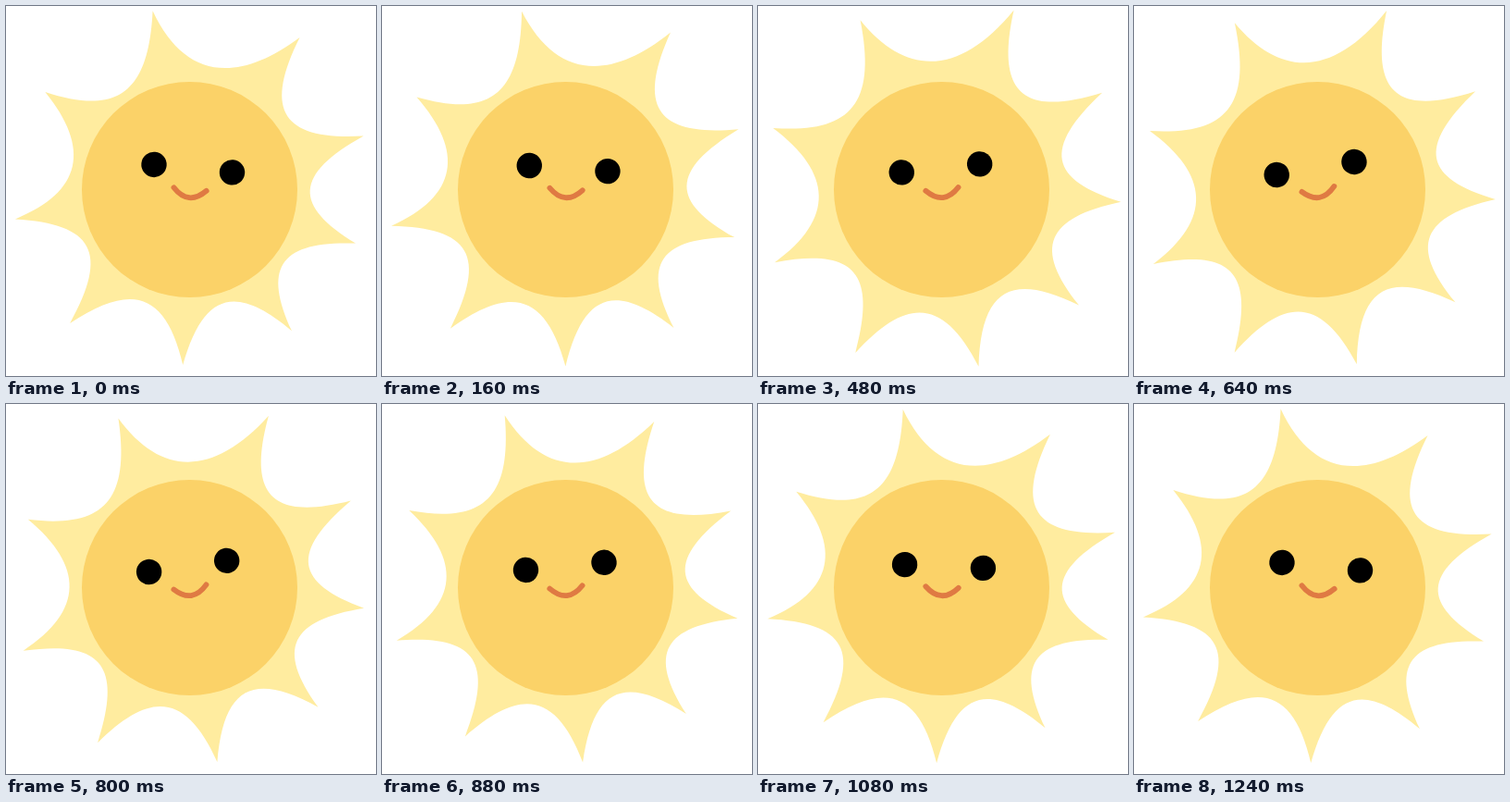
These frames come from a looping animation (400 by 400 pixels, 1.28 s). An HTML page:

```html
<!DOCTYPE html>
<html lang="en">
<head>
<meta charset="utf-8">
<title>Smiling sun</title>
<style>
  html, body { margin: 0; width: 100%; height: 100%; overflow: hidden; background: #fff; }
  svg { display: block; width: 100%; height: 100%; }
</style>
</head>
<body>
<svg viewBox="0 0 400 400">
  <path id="rays" fill="#ffec9f"/>
  <circle cx="198.5" cy="198.5" r="116.5" fill="#fbd268"/>
  <g id="face">
    <circle cx="157.5" cy="175.4" r="13.7"/>
    <circle cx="242.4" cy="175.4" r="13.7"/>
    <path d="M181.3 198Q199 216.4 216.7 198" fill="none" stroke="#df7a43" stroke-width="5.8" stroke-linecap="round"/>
  </g>
</svg>
<script>
const LOOP = 1280;
const rays = document.getElementById('rays');
const face = document.getElementById('face');

// Each ray: tip angle (clockwise from up), tip radius, then the hollow after it:
// its depth and how far its two handles sit from the tips, as parts of the gap
const tips = [
  [-11.6, 197, 122, 0.18, 0.26], [36, 203, 115, 0.2, 0.28], [73, 197, 114, 0.26, 0.26],
  [108, 189, 114, 0.31, 0.21], [144.1, 189, 113, 0.26, 0.26], [182.1, 190, 116, 0.26, 0.26],
  [221.7, 194, 110, 0.26, 0.26], [260.3, 191, 115.5, 0.19, 0.26], [304, 188, 112, 0.26, 0.26]
];

function polar(angle, radius) {
  const a = angle * Math.PI / 180;
  return `${radius * Math.sin(a)} ${-radius * Math.cos(a)} `;
}

let outline = 'M' + polar(...tips[0]);
tips.forEach(([angle, , depth, lead, trail], i) => {
  const [next, radius] = tips[(i + 1) % tips.length];
  const gap = (next - angle + 360) % 360;
  outline += 'C' + polar(angle + gap * lead, depth) + polar(next - gap * trail, depth) + polar(next, radius);
});
rays.setAttribute('d', outline + 'Z');

function ease(t, start, end) {
  const u = Math.min(1, Math.max(0, (t - start) / (end - start)));
  return u * u * (3 - 2 * u);
}

// Goes from 0 to 1 and back to 0
const swing = (t, a, b, c, d) => ease(t, a, b) - ease(t, c, d);

function draw(now) {
  const t = now % LOOP;
  const turn = -14.8 * swing(t, 36, 555, 640, 1140);
  const scale = 1 + 0.03 * swing(t, 36, 460, 460, 940);
  const tilt = 5.7 - 15.5 * swing(t, 30, 690, 690, 1240);
  rays.setAttribute('transform', `translate(198.2 198.2) rotate(${turn}) scale(${scale})`);
  face.setAttribute('transform', `rotate(${tilt} 198.5 198.5)`);
}

const origin = performance.now();
function tick() {
  draw(performance.now() - origin);
  requestAnimationFrame(tick);
}
tick();
</script>
</body>
</html>
```
